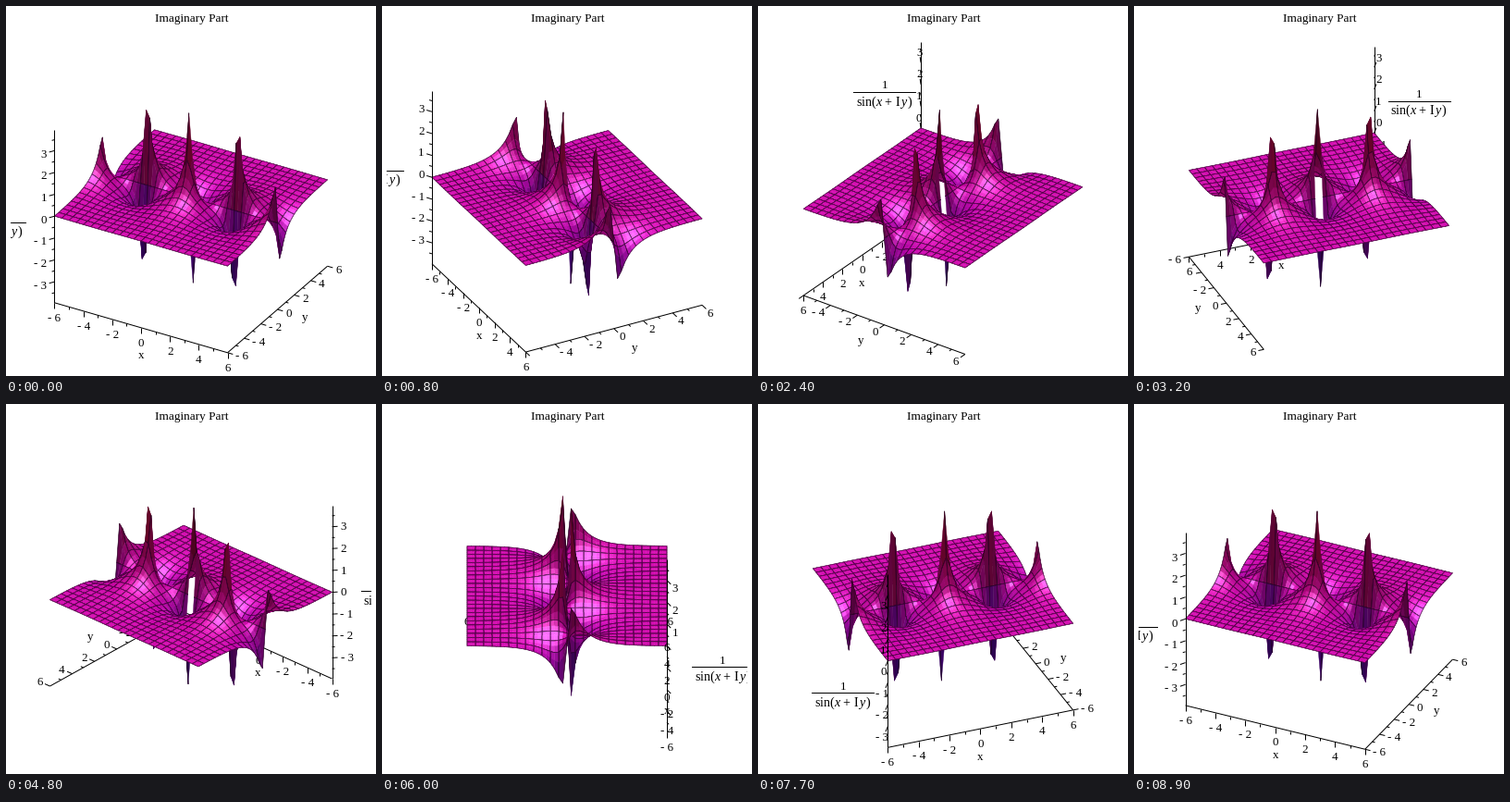
Write a matplotlib script that moves like this. It is 400 by 400 pixels and loops after 9000 ms.

```python
import numpy as np
import matplotlib.pyplot as plt
from matplotlib.animation import FuncAnimation
from matplotlib.collections import LineCollection, PolyCollection
from matplotlib.colors import hsv_to_rgb

PX = 0.72                      # points per pixel at 100 dpi
FRAMES = 90
CENTER = np.array([200, 207.5])
ZMAX = 1 / np.sinh(0.25)
UNIT = 18                      # pixels per x or y unit
ZUNIT = 216 / (2 * ZMAX)
ELEV = np.radians(30)
VIEW = np.array([0, np.cos(ELEV), np.sin(ELEV)])
LIGHT = np.array([0, np.sin(np.radians(5)), np.cos(np.radians(5))])
HALF = (VIEW + LIGHT) / np.linalg.norm(VIEW + LIGHT)

plt.rcParams.update({
    'font.family': 'Liberation Serif',
    'mathtext.fontset': 'custom',
    'mathtext.rm': 'Liberation Serif',
    'mathtext.it': 'Liberation Serif:italic',
})

fig = plt.figure(figsize=(4, 4), dpi=100, facecolor='white')
ax = fig.add_axes([5 / 400, 5 / 400, 390 / 400, 390 / 400])
ax.set(xlim=(5, 395), ylim=(395, 5))
ax.axis('off')


def project(x, y, z, a):
    """Orthographic view of the box turned by angle a, in pixels."""
    c, s = np.cos(a), np.sin(a)
    u = UNIT * (x * s - y * c)
    px = CENTER[0] + UNIT * (x * c + y * s)
    py = CENTER[1] + u * np.sin(ELEV) - z * ZUNIT * np.cos(ELEV)
    return np.stack(np.broadcast_arrays(px, py), -1)


# Surface: Im(1 / sin(x + iy)) on a 49 x 49 grid, undefined at the origin
grid = np.linspace(-6, 6, 49)
GX, GY = np.meshgrid(grid, grid, indexing='ij')
with np.errstate(all='ignore'):
    GZ = -np.cos(GX) * np.sinh(GY) / (np.sin(GX) ** 2 + np.sinh(GY) ** 2)

I, J = [k.ravel() for k in np.meshgrid(range(48), range(48), indexing='ij')]
CI = np.stack([I, I + 1, I + 1, I], 1)
CJ = np.stack([J, J, J + 1, J + 1], 1)
keep = np.isfinite(GZ[CI, CJ]).all(1)
I, J, CI, CJ = I[keep], J[keep], CI[keep], CJ[keep]
QX, QY, QZ = GX[CI, CJ], GY[CI, CJ], GZ[CI, CJ]
SLOPE = ZUNIT / UNIT / 0.5
ZX = (QZ[:, 1] + QZ[:, 2] - QZ[:, 0] - QZ[:, 3]) * SLOPE
ZY = (QZ[:, 2] + QZ[:, 3] - QZ[:, 0] - QZ[:, 1]) * SLOPE

# Mesh lines run along every second grid line: one L shape per cell
EI, EJ = I + I % 2, J + J % 2
OI, OJ = 2 * I + 1 - EI, 2 * J + 1 - EJ
LI = np.stack([OI, EI, EI, EI], 1)
LJ = np.stack([EJ, EJ, OJ, EJ], 1)

level = np.clip(QZ.mean(1) / ZMAX, -1, 1)
BASE = hsv_to_rgb(np.stack([0.863 + np.where(level < 0, 0.17, 0.12) * level,
                            np.full(len(I), 0.96),
                            np.full(len(I), 0.82)], 1))

surface = PolyCollection([], zorder=5)
ax.add_collection(surface)
N = len(I)
WIDTHS = np.tile([0.4 * PX, 0.7 * PX], N)


def shade(a):
    c, s = np.cos(a), np.sin(a)
    n = np.stack([-(ZX * c + ZY * s), -(ZX * s - ZY * c), np.ones(N)], 1)
    n /= np.linalg.norm(n, axis=1)[:, None]
    n *= np.where(n @ VIEW < 0, -1, 1)[:, None]
    diffuse = 0.36 + 0.64 * np.abs(n @ LIGHT)
    shine = 0.42 * np.clip(n @ HALF, 0, 1) ** 20
    return np.clip(BASE * diffuse[:, None] + shine[:, None], 0, 1)


def draw_surface(a):
    order = np.argsort((QX * np.sin(a) - QY * np.cos(a)).mean(1))
    pts = project(GX, GY, GZ, a)
    verts = np.empty((2 * N, 4, 2))
    verts[0::2] = pts[CI, CJ][order]
    verts[1::2] = pts[LI, LJ][order]
    face = np.zeros((2 * N, 4))
    face[0::2, :3] = shade(a)[order]
    face[0::2, 3] = 1
    edge = face.copy()
    edge[1::2] = (0.1, 0, 0.1, 0.5)
    surface.set_verts(verts)
    surface.set_facecolor(face)
    surface.set_edgecolor(edge)
    surface.set_linewidth(WIDTHS)


def put(s, size=13, **kw):
    return ax.text(0, 0, s, size=size * PX, ha=kw.pop('ha', 'center'),
                   va='baseline', color='black', clip_on=True, **kw)


def number(v):
    return f'- {-v}' if v < 0 else str(v)


class Axis:
    """One edge of the box with ticks and numbers."""

    def __init__(self, place, end, majors, minors):
        self.place, self.end = place, end
        self.majors, self.minors = majors, minors
        self.texts = [put(number(v)) for v in majors]
        self.lines = LineCollection([], colors='black', linewidths=PX)
        ax.add_collection(self.lines)

    def draw(self, a, d, gap, front, taken):
        at = lambda v: project(*self.place(v), a)
        z = 10 if front else 1
        segs = [(at(-self.end), at(self.end))]
        segs += [(at(v), at(v) + 6 * d) for v in self.majors]
        segs += [(at(v), at(v) + 3 * d) for v in self.minors]
        self.lines.set_segments(segs)
        self.lines.set_zorder(z)
        placed = []
        for v, t in zip(self.majors, self.texts):
            half = 7 if v < 0 else 3.2
            p = at(v) + d * (9 + half, gap)
            t.set_position((p[0], p[1] + 4.3))
            t.set_zorder(z)
            # a number gives way to those of the axes drawn before
            t.set_visible(not any(abs(p[0] - q[0]) < half + h + 3
                                  and abs(p[1] - q[1]) < 11
                                  for q, h in taken))
            placed.append((p, half))
        taken += placed


evens, odds = range(-6, 7, 2), range(-5, 6, 2)
x_axis = Axis(lambda v: (v, -6, -ZMAX), 6, evens, odds)
y_axis = Axis(lambda v: (6, v, -ZMAX), 6, evens, odds)
z_axis = Axis(lambda v: (-6, -6, v), ZMAX, range(-3, 4),
              np.arange(-3.5, 4, 1))

title = put('Imaginary Part', 13.2)
title.set_position((201, 17))
x_name, y_name = put('x'), put('y')
top = put('1')
bottom = put(r'$\mathrm{sin}(x\,+\,\mathrm{I}\,y)$', 14)
bar, = ax.plot([], [], color='black', lw=PX)


def draw_formula(a, d, front):
    p = project(-6, -6, 0, a)
    side = 1 if d[0] > 0 else -1
    near = p[0] + side * min(38 * abs(d[0]), 31)
    mid, y = near + side * 33.5, p[1] + d[1] * (24 + 16 * d[1] ** 2)
    bar.set_data([mid - 33.5, mid + 33.5], [y, y])
    top.set_position((mid, y - 3.5))
    bottom.set_position((mid, y + 14.5))
    for artist in (bar, top, bottom):
        artist.set_zorder(10 if front else 1)


def draw(i):
    a = np.radians(30 + 360 * i / FRAMES)
    c, s = np.cos(a), np.sin(a)
    x_front, y_front = c > -1e-9, s > 0
    z_front = x_front or s < 0

    down = np.array([0, 1.0])
    out = np.array([c, s * np.sin(ELEV)])
    out /= np.hypot(*out)
    corner = np.array([-(c + s), c - s]) / np.sqrt(2)

    draw_surface(a)
    taken = []
    x_axis.draw(a, down, 15.5, x_front, taken)
    y_axis.draw(a, out, 12, y_front, taken)
    z_axis.draw(a, corner, 12, z_front, taken)

    x_name.set_position(project(0, -6, -ZMAX, a) + (0, 33.5))
    x_name.set_zorder(10 if x_front else 1)
    y_name.set_position(project(6, 0, -ZMAX, a) + 31 * out + (0, 3))
    y_name.set_zorder(10 if y_front else 1)
    draw_formula(a, corner, z_front)
    return []


anim = FuncAnimation(fig, draw, frames=FRAMES, interval=100,
                     init_func=lambda: draw(0), repeat=True, repeat_delay=0)
plt.show()
```
